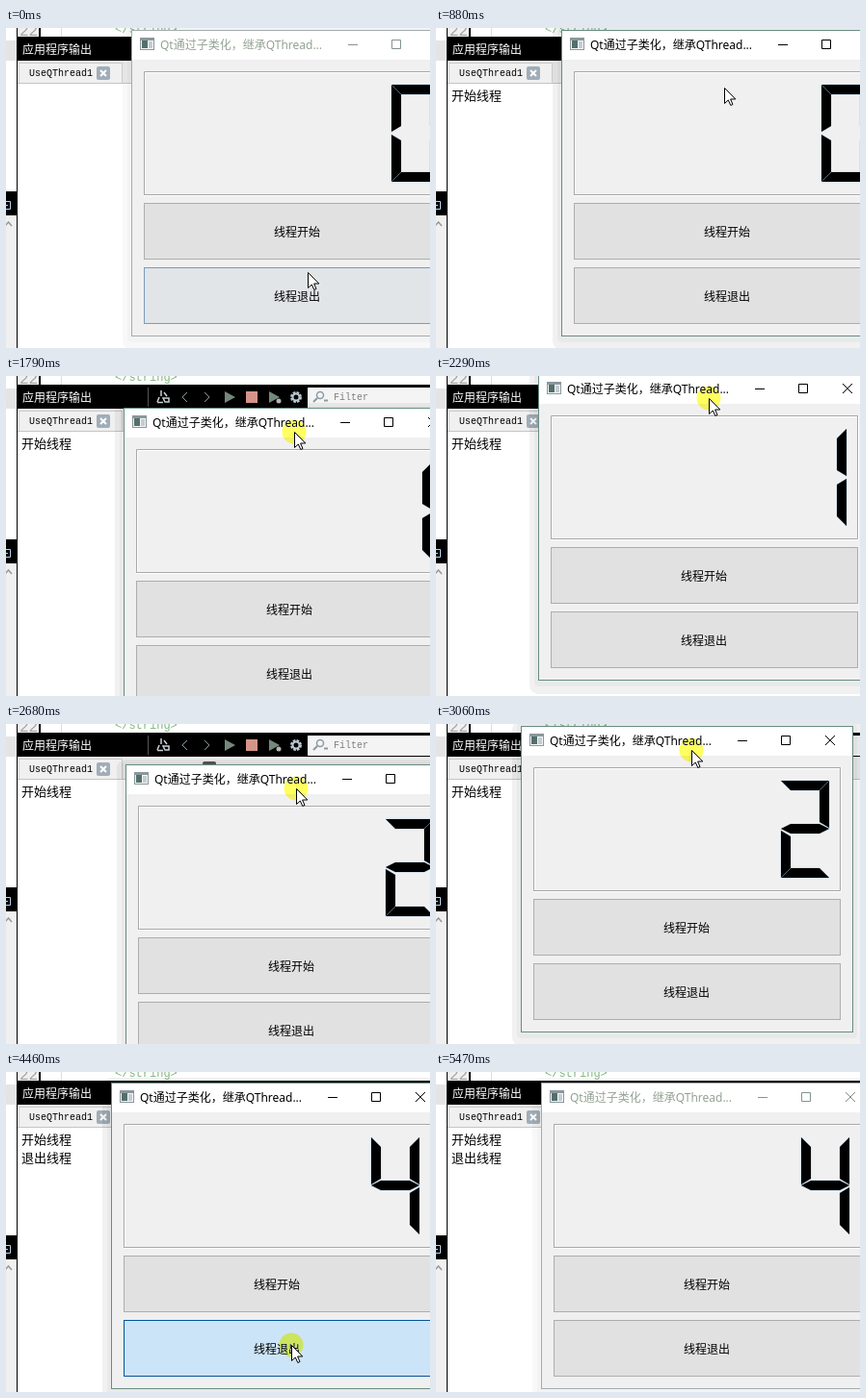
An HTML page for the animation above (5610 ms loop, 440 px wide and 333 px high).

```html
<!DOCTYPE html>
<html lang="zh-CN">
<head>
<meta charset="utf-8">
<style>
html, body { margin: 0; width: 100%; height: 100%; overflow: hidden; background: #fff; }
svg { display: block; width: 440px; height: 333px; }
text { font: 12px "Noto Sans CJK SC", "Noto Sans CJK", sans-serif; dominant-baseline: central; }
.mono { font: 10px "Liberation Mono", monospace; }
.title { font-family: "Noto Sans", "Noto Sans CJK SC", "Noto Sans CJK", sans-serif; }
.log { font-size: 13px; }
.mid { text-anchor: middle; }
.line { fill: none; stroke-width: 1; }
.idle { fill: #e1e1e1; stroke: #adadad; }
.hover { fill: #e5f1fb; stroke: #0078d7; }
.press { fill: #cce4f7; stroke: #005499; }
#digit path { fill: #000; stroke: #b4d2ee; stroke-width: .9; paint-order: stroke; }
#spot { fill: #ffff60; mix-blend-mode: darken; }
</style>
</head>
<body>
<svg viewBox="0 0 440 333">
  <rect width="440" height="333" fill="#fff"/>

  <!-- editor edge -->
  <rect x="12" width="22" height="9" fill="#f0f0f0"/>
  <text class="mono" x="14" y="4" style="font-size:16px" fill="#a4a4a4">22</text>
  <rect x="34" width="2" height="10"/>
  <rect x="57" width="1" height="10" fill="#ddd"/>
  <text class="mono" x="113" y="2" style="font-size:12px" fill="#7fb87f">&lt;/string&gt;</text>

  <!-- left column -->
  <rect y="13" width="11" height="21" fill="#e4e4e4"/>
  <rect y="195" width="11" height="138" fill="#f0f0f0"/>
  <rect y="170" width="11" height="25"/>
  <path class="line" d="M-1 180.500H4.500V188.500H-1M0 184.500H2" stroke="#b8d4f0"/>
  <path class="line" d="M-1 206L2.500 202L6 206" stroke="#999" style="stroke-width:1.500"/>
  <rect x="11" width="1" height="333"/>

  <!-- output pane header -->
  <rect x="11" y="9" width="429" height="25"/>
  <text x="17" y="21.500" fill="#fff">应用程序输出</text>
  <rect x="147" y="12" width="1" height="20" fill="#555"/>
  <path class="line" d="M161 15V21M157 27.500H163M159 22L157 27M163 23H169V27H165ZM164 17L167 21" stroke="#c8d0d4" style="stroke-width:1.500"/>
  <path class="line" d="M188 17L183 22L188 27M206 17L211 22L206 27" stroke="#8298a4"/>
  <path d="M227 16L238 22L227 28ZM273 16L284 22L273 28Z" fill="#74887c"/>
  <circle cx="283" cy="26" r="2.500" fill="#b5b5b5"/>
  <rect x="249" y="16" width="12" height="12" fill="#d69488"/>
  <circle cx="301" cy="22" r="4.500" fill="none" stroke="#b8c8d0" stroke-width="3" stroke-dasharray="2.400 1.130"/>
  <circle class="line" cx="301" cy="22" r="3.500" stroke="#b8c8d0" style="stroke-width:2"/>
  <rect x="313" y="12" width="127" height="21" fill="#f4f4f4"/>
  <circle class="line" cx="326" cy="20" r="3.500" stroke="#8a9aa4" style="stroke-width:1.500"/>
  <path class="line" d="M323 23L319 27M330 25.500H334" stroke="#8a9aa4" style="stroke-width:2"/>
  <text class="mono" x="340" y="22.500" fill="#7c807c">Filter</text>

  <!-- tabs -->
  <rect x="12" y="34" width="428" height="24" fill="#ececec"/>
  <rect x="13.500" y="36.500" width="107" height="21" fill="#f0f0f0" stroke="#ccc"/>
  <path class="line" d="M12 57.500H440" stroke="#c4c4c4"/>
  <text class="mono" x="24" y="47">UseQThread1</text>
  <rect x="94" y="40" width="14" height="14" rx="2" fill="#a0adb8"/>
  <path class="line" d="M98 44L104 50M104 44L98 50" stroke="#fff" style="stroke-width:2"/>
  <rect x="204" y="39" width="14" height="14" rx="2" fill="#555"/>

  <text class="log" id="started" x="16" y="69">开始线程</text>
  <text class="log" id="stopped" x="16" y="88">退出线程</text>

  <g id="win">
    <g id="shadow">
      <rect x="-9" y="-5" width="363" height="338" rx="9" opacity=".055"/>
      <rect x="-4" y="-2" width="353" height="327" rx="4" opacity=".03"/>
    </g>
    <rect width="345" height="319" fill="#f0f0f0"/>
    <rect width="345" height="31" fill="#fff"/>
    <rect id="edge" class="line" x=".5" y=".5" width="344" height="318"/>
    <rect x="9" y="8" width="15" height="13" fill="#8b979c"/>
    <rect x="10" y="11" width="13" height="9" fill="#f4f6f7"/>
    <rect x="11" y="11" width="6" height="8" fill="#53706c"/>
    <rect x="18" y="12" width="4" height="7" fill="#c3cdd2"/>
    <text class="title" id="title" x="30" y="15">Qt通过子类化，继承QThread...</text>
    <path id="controls" class="line" d="M225 15.500H235M270.500 10.500H279.500V19.500H270.500ZM316 10L326 20M326 10L316 20"/>
    <path class="line" d="M14.500 171V44.500H331M13 172.500H332.500V43" stroke="#fff"/>
    <path class="line" d="M13.500 172V43.500H332M14 171.500H331.500V44" stroke="#a8a8a8"/>
    <g id="digit" transform="translate(270 57)"></g>
    <g id="start" transform="translate(13.500 180.500)"></g>
    <text class="mid" x="172" y="209">线程开始</text>
    <g id="quit" transform="translate(13.500 247.500)"></g>
    <text class="mid" x="172" y="276">线程退出</text>
  </g>

  <g id="cursor">
    <circle id="spot" r="12.500"/>
    <path d="M.5 .5V16.500L4.300 13L6.800 18.500L9 17.500L6.600 12H11.800Z" fill="#fff" stroke="#000"/>
  </g>
</svg>
<script>
const LOOP = 5610, TICK = 64, TICK_START = 40;
const ACTIVATED = 350, STARTED = 480, GRAB = 1400, DROP = 3450, STOPPED = 4460, DEACTIVATED = 5470;
const FIRST_COUNT = 1580, COUNT_EVERY = 960;

const $ = id => document.getElementById(id);
const show = (id, on) => $(id).setAttribute('visibility', on ? 'visible' : 'hidden');
const move = (id, [x, y]) => $(id).setAttribute('transform', `translate(${Math.round(x)} ${Math.round(y)})`);
const ramp = (t, from, to) => Math.min(1, Math.max(0, (t - from) / (to - from)));
const smooth = (t, from, to) => { const p = ramp(t, from, to); return p * p * (3 - 2 * p); };
const mix = (a, b, p) => a.map((v, i) => v + (b[i] - v) * p);
const fade = (t, on, off) => ramp(t, on, on + 100) - ramp(t, off, off + 180);
const cosDeg = a => Math.cos(a * Math.PI / 180);

// The dragged window is swung round in a slowly widening loop.
function windowAt(t) {
  const s = t - 1776, turn = .414 * s, size = 1 + s / 2000;
  const swing = [110.5 + 17 * size * cosDeg(turn + 50), 20 + 17.5 * size * cosDeg(turn - 38)];
  return mix(mix([130, 2], swing, smooth(t, 1540, 1740)), [109, 11], smooth(t, 3150, DROP));
}

const grip = t => { const [x, y] = windowAt(t); return [x + 177, y + 25]; };

const stops = [[0, 313, 254], [300, 306, 215], [600, 306, 215], [870, 299, 62], [1140, 299, 36],
  [GRAB, ...grip(GRAB)], [DROP, ...grip(DROP)], [3620, 270, 116], [4100, 296, 284]];

function cursorAt(t) {
  if (t >= GRAB && t < DROP) return grip(t);
  const next = stops.findIndex(s => s[0] > t);
  if (next < 0) return stops[stops.length - 1].slice(1);
  const [a, ...from] = stops[next - 1], [b, ...to] = stops[next];
  return mix(from, to, ramp(t, a, b));
}

// Segments are three shapes, mirrored: top, upper left, upper right, middle, lower left, lower right, bottom.
const bar = 'M0 0H50L40 10H10Z', side = 'M0 0L10 10V43L0 49Z', middle = 'M0 50L10 45H40L50 50L40 55H10Z';
const flipX = 'translate(50 0) scale(-1 1)', flipY = 'translate(0 101) scale(1 -1)';
const segments = [[bar, ''], [side, ''], [side, flipX], [middle, ''], [side, flipY],
  [side, flipX + flipY], [bar, flipY]];
const lit = ['012456', '25', '02346', '02356', '1235'];
let shown = -1;

function drawDigit(n) {
  if (n === shown) return;
  shown = n;
  $('digit').innerHTML = [...lit[n]].map(i =>
    `<path d="${segments[i][0]}" transform="${segments[i][1]}"/>`).join('');
}

for (const id of ['start', 'quit'])
  $(id).innerHTML = ['idle', 'hover', 'press'].map(c => `<rect class="${c}" width="318" height="58"/>`).join('');

function drawButton(id, hover, press) {
  const [, over, down] = $(id).children;
  over.setAttribute('opacity', hover);
  down.setAttribute('opacity', press);
}

function draw(now) {
  const time = now % LOOP;
  const t = Math.max(0, TICK_START + TICK * Math.floor((time - TICK_START) / TICK));
  const present = time < DEACTIVATED, active = present && t >= ACTIVATED;
  const pressed = (from, to) => t >= from && t < to;

  move('win', windowAt(t));
  move('cursor', cursorAt(t));
  show('cursor', present);
  show('spot', present && (pressed(340, STARTED) || pressed(1330, DROP) || pressed(4250, 4500)));
  show('started', time >= STARTED);
  show('stopped', time >= STOPPED);
  $('shadow').setAttribute('opacity', active ? 1 : .55);
  $('edge').setAttribute('stroke', active ? '#688c84' : '#a4acb0');
  $('title').setAttribute('fill', active ? '#000' : '#94a294');
  $('controls').setAttribute('stroke', active ? '#000' : '#84948a');
  drawDigit(Math.min(4, Math.max(0, Math.floor((time - FIRST_COUNT) / COUNT_EVERY) + 1)));
  drawButton('start', fade(t, 150, 690), fade(t, 300, STARTED));
  drawButton('quit', present ? fade(t, -30, 60) + fade(t, 4000, LOOP) : 0, fade(t, 4220, 4500));
}

const began = performance.now();
function frame() {
  draw(performance.now() - began);
  requestAnimationFrame(frame);
}
frame();
</script>
</body>
</html>
```
